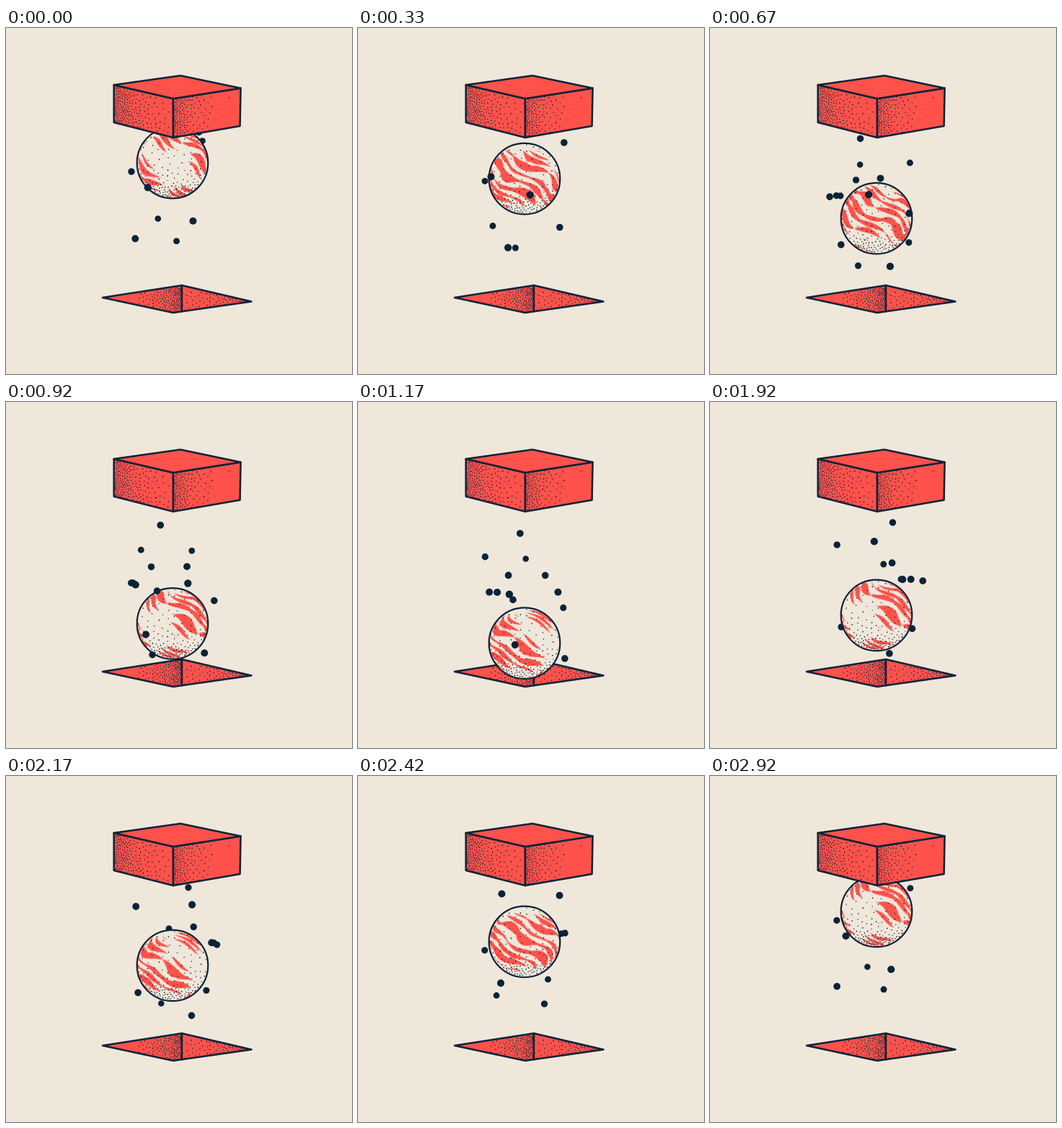
An HTML page with a canvas for the animation above (3010 ms loop, 480 by 480 pixels).

```html
<!DOCTYPE html>
<html lang="en">
<head>
<meta charset="utf-8">
<title>Bouncing planet</title>
<style>
  html, body { margin: 0; width: 100%; height: 100%; overflow: hidden; background: #efe7da; }
  canvas { display: block; width: 480px; height: 480px; }
</style>
</head>
<body>
<canvas id="stage"></canvas>
<script>
const CREAM = '#efe7da', RED = '#fe524b', INK = '#0a2339';
const LOOP = 3010, STEP = 1000 / 12, STEPS = 36;
const CX = 231, R = 49.3, REST = 261, EYE = 245;
const TAU = Math.PI * 2, RAD = Math.PI / 180;

const canvas = document.getElementById('stage');
const ctx = canvas.getContext('2d');
const dpr = window.devicePixelRatio || 1;
canvas.width = canvas.height = 480 * dpr;

let seed = 7;
function random() {
  seed = (seed * 16807) % 2147483647;
  return seed / 2147483647;
}

const clamp = v => Math.min(1, Math.max(0, v));

function poly(...pts) {
  const path = new Path2D();
  for (let i = 0; i < pts.length; i += 2) path.lineTo(pts[i], pts[i + 1]);
  path.closePath();
  return path;
}

function circle(x, y, r) {
  const path = new Path2D();
  path.arc(x, y, r, 0, TAU);
  return path;
}

// Ink grains inside a path; gap(x, y) is the local spacing.
function stipple(path, x0, y0, x1, y1, gap) {
  const grains = [], out = new Path2D();
  for (let i = 0; i < 8000; i++) {
    const x = x0 + random() * (x1 - x0), y = y0 + random() * (y1 - y0);
    if (!ctx.isPointInPath(path, x, y)) continue;
    const g = gap(x, y);
    if (grains.some(p => Math.hypot(p[0] - x, p[1] - y) < g)) continue;
    grains.push([x, y]);
    const r = 0.7 + random() * 0.2;
    out.moveTo(x + r, y);
    out.arc(x, y, r, 0, TAU);
  }
  return out;
}

// Box and pit
const lid = poly(149.7, 79, 242, 66, 325.6, 83.5, 232, 98);
const left = poly(149.7, 79, 232, 98, 232, 152, 149.7, 131);
const right = poly(232, 98, 325.6, 83.5, 324.6, 136, 232, 152);
const pitLeft = poly(134, 374, 244, 357, 244, 393.3, 232, 395);
const pitRight = poly(244, 357, 340.5, 379.5, 244, 393.3);

const leftGrain = stipple(left, 150, 79, 232, 152, (x, y) => {
  const u = (x - 150) / 82, v = (y - 79 - u * 19) / 54;
  return 2.1 + 7 * u ** 1.5 * (1.3 - 0.7 * v);
});
const rightGrain = stipple(right, 232, 84, 325, 152, x => {
  const u = (x - 232) / 93;
  return u > 0.58 ? 99 : 1.9 + 12 * u ** 1.3;
});
const pitLeftGrain = stipple(pitLeft, 134, 357, 244, 394, x => {
  const u = (244 - x) / 110;
  return u > 0.55 ? 99 : 1.6 + 6 * u;
});
const pitRightGrain = stipple(pitRight, 244, 357, 340, 393, x => 1.6 + 4.5 * (340 - x) / 96);

const ballGrain = stipple(circle(R, R, R - 2), 0, 0, 2 * R, 2 * R, (x, y) => {
  const rim = Math.hypot(x - R, y - R) / R;
  return 3 + 5.5 * clamp(1 - 1.1 * (y / R - 1) - 0.4 * (rim - 0.5));
});

// Land cores as longitude and latitude (down is positive)
const cores = [
  [-98, -28], [-60, 12], [-52, 30], [-102, 20], [-15, -45], [-150, 0], [-118, -25], [-120, 25],
  [-172, -28], [-172, 28], [146, -12], [164, 18], [83, -15], [108, 12], [107, -45], [54, 1],
  [52, -34], [79, -18], [30, 64]
].map(([lon, lat]) => {
  const a = lon * RAD, b = lat * RAD;
  return [Math.sin(a) * Math.cos(b), Math.sin(b), Math.cos(a) * Math.cos(b)];
});

// Soft cores broken up by warped diagonal veins; returns red coverage 0..1
function landAt(x, y, z) {
  let near = -1;
  for (const c of cores) near = Math.max(near, c[0] * x + c[1] * y + c[2] * z);
  const core = Math.exp((near - 1) * 15);
  const lon = Math.atan2(x, z), lat = Math.asin(y);
  const warp = 1.7 * Math.sin(3 * lon + 4 * lat) + 1.1 * Math.sin(5 * lon - 6 * lat + 1);
  const vein = Math.sin(20 * lat - 11 * lon + warp);
  return clamp((core + 0.4 * vein - 0.6) * 9 + 0.5);
}

const globe = document.createElement('canvas');
const size = globe.width = globe.height = Math.ceil(2 * R * dpr);
const globeCtx = globe.getContext('2d');
const pixels = globeCtx.createImageData(size, size);
const redRgb = [1, 3, 5].map(i => parseInt(RED.slice(i, i + 2), 16));

function paintGlobe(turn) {
  const c = Math.cos(turn), s = Math.sin(turn);
  for (let j = 0, k = 0; j < size; j++) {
    for (let i = 0; i < size; i++, k += 4) {
      const x = (2 * i + 1) / size - 1, y = (2 * j + 1) / size - 1;
      const zz = 1 - x * x - y * y;
      pixels.data[k + 3] = 0;
      if (zz <= 0) continue;
      const z = Math.sqrt(zz);
      pixels.data.set(redRgb, k);
      pixels.data[k + 3] = 255 * landAt(x * c - z * s, y, z * c + x * s);
    }
  }
  globeCtx.putImageData(pixels, 0, 0);
}

// Moon belts: height, orbit radius, then the start angle of each moon
const moons = [
  [153, 23, -155], [183, 55, 38, 127], [209, 30, 174, -70], [231, 57, -90, 166, -178],
  [233, 65, -157], [242, 22, 175], [255, 58, -33], [298, 50, 206, 32], [322, 56, -62], [330, 28, 168]
].flatMap(([height, radius, ...starts]) => starts.map(start => ({ height, radius, start })));

// A cosine bounce whose phase runs ahead near the floor
function ballY(step) {
  const a = step * 10;
  return 263.5 - 76.5 * Math.cos((a + 10.5 - 9 * Math.cos((a + 10) * RAD)) * RAD);
}

function fill(path, color) {
  ctx.fillStyle = color;
  ctx.fill(path);
}

function panel(path, grain) {
  fill(path, RED);
  if (grain) fill(grain, INK);
  ctx.lineWidth = 2.5;
  ctx.stroke(path);
}

function placeMoon({ height, radius, start }, step, y) {
  const a = (start + step * 10) * RAD;
  const z = radius * Math.cos(a), scale = 1 + z * 0.00175;
  const h = height + 0.43 * (y - REST);
  return {
    x: CX + radius * Math.sin(a) * scale,
    y: EYE + (h - EYE) * scale,
    r: 4.7 * scale,
    front: z > 0 && Math.hypot(radius, h - y) > R
  };
}

function drawMoon(m) {
  fill(circle(m.x, m.y, m.r), INK);
}

function drawBall(y, turn) {
  const edge = circle(R, R, R);
  paintGlobe(turn);
  ctx.save();
  ctx.translate(CX - R, y - R);
  fill(edge, CREAM);
  ctx.drawImage(globe, 0, 0, 2 * R, 2 * R);
  fill(ballGrain, INK);
  ctx.lineWidth = 2.2;
  ctx.stroke(edge);
  ctx.restore();
}

function draw(step) {
  ctx.setTransform(dpr, 0, 0, dpr, 0, 0);
  ctx.fillStyle = CREAM;
  ctx.fillRect(0, 0, 480, 480);
  ctx.strokeStyle = INK;
  ctx.lineJoin = 'round';

  panel(pitLeft, pitLeftGrain);
  panel(pitRight, pitRightGrain);

  const y = ballY(step);
  const spots = moons.map(m => placeMoon(m, step, y));
  spots.filter(m => !m.front).forEach(drawMoon);
  drawBall(y, step * 30 * RAD);
  spots.filter(m => m.front).forEach(drawMoon);

  panel(left, leftGrain);
  panel(right, rightGrain);
  panel(lid);
}

const begin = performance.now();
let shown = -1;
function tick() {
  const t = (performance.now() - begin) % LOOP;
  const step = Math.min(STEPS - 1, Math.floor((t + 3.4) / STEP));
  if (step !== shown) draw(shown = step);
  requestAnimationFrame(tick);
}
tick();
</script>
</body>
</html>
```
